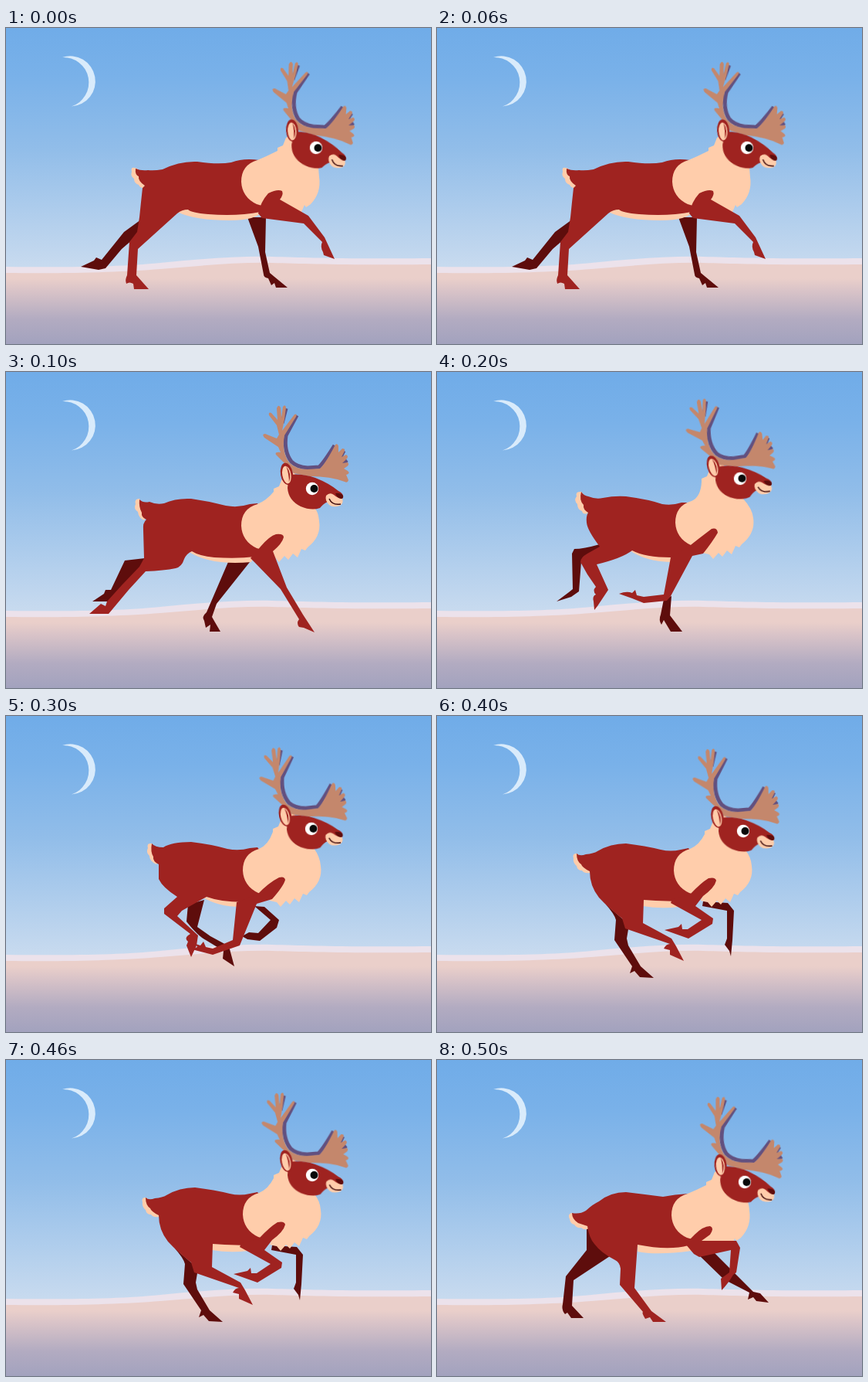
An HTML page that plays this animation: 551x409 px, repeating every 600 ms.

```html
<!DOCTYPE html>
<html lang="en">
<head>
<meta charset="utf-8">
<title>Running reindeer</title>
<style>
  html, body { margin: 0; width: 100%; height: 100%; overflow: hidden; }
  svg { display: block; width: 551px; height: 409px; overflow: hidden; }
  .red { fill: #9f2320; }
  .dark { fill: #5e0d0c; }
  .cream { fill: #ffcdab; }
  .antler { fill: #c4876c; }
  .shade { fill: none; stroke: #62507f; stroke-width: 5; stroke-linejoin: round; }
</style>
</head>
<body>
<svg viewBox="0 0 551 409">
  <defs>
    <linearGradient id="sky" x2="0" y2="1">
      <stop offset="0" stop-color="#70ace8"/>
      <stop offset=".2" stop-color="#79b1e9"/>
      <stop offset=".5" stop-color="#91bde9"/>
      <stop offset="1" stop-color="#c9dbef"/>
    </linearGradient>
    <linearGradient id="ground" gradientUnits="userSpaceOnUse" x1="0" y1="303" x2="0" y2="409">
      <stop offset=".2" stop-color="#eacfca"/>
      <stop offset=".34" stop-color="#dac4c8"/>
      <stop offset=".7" stop-color="#b2abc1"/>
      <stop offset="1" stop-color="#a2a2be"/>
    </linearGradient>
    <g id="head">
      <path class="shade" d="M377 56L363 82Q360 103 370 116Q377 123 391 124L406 123Q413 116 426 95M363 47L358 66M438 102L434 110M442 114L436 119"/>
      <path class="antler" d="M373 131L360 117L350 107Q348 103 356 104L353 97L335 85Q331 80 336 80L351 86L354 81L351 69L341 56Q340 51 344 53L352 62L351 47Q353 41 356 46L357 60L359 45Q362 41 363 46L361 61L358 76L374 55Q378 53 376 58L361 82Q357 103 367 117Q376 126 391 126L407 125Q414 119 427 94Q430 92 431 96L431 104L436 99Q441 99 438 104L435 110L441 107Q445 109 441 113L436 118L443 117Q446 120 441 123L438 125L443 128Q447 131 441 133L444 140Q443 144 439 142Q421 135 394 135Z"/>
      <path class="red" d="M367 133Q384 131 401 137Q419 144 431 154Q437 157 437 161L434 170L417 168Q412 170 407 176Q396 180 382 174Q366 166 365 150Z"/>
      <path class="cream" d="M415 160Q420 155 425 159Q429 163 436 164Q438 170 433 173Q424 176 419 172Q413 166 415 160Z"/>
      <path d="M427 157Q434 156 437 160Q438 164 434 164Q429 163 427 157Z" fill="#5e0d0c"/>
      <path d="M419 164Q423 173 434 171" fill="none" stroke="#3b0909" stroke-width="1.5"/>
      <circle cx="397" cy="151" r="8.2" fill="#fff"/>
      <circle cx="399.5" cy="151" r="5" fill="#090909"/>
      <g transform="rotate(-10 364 132)">
        <ellipse class="red" cx="364" cy="132" rx="8" ry="14.5"/>
        <ellipse class="cream" cx="363.7" cy="133" rx="5.6" ry="11.5"/>
        <path class="red" d="M365 122Q371 133 365 143Q367 133 365 122Z"/>
      </g>
    </g>
  </defs>
  <path fill="url(#sky)" d="M0 0H551V312H0Z"/>
  <path fill="#d9ebfb" d="M73 38A32.6 32.6 0 1 1 85 101.500A32.6 32.6 0 0 0 73 38Z"/>
  <path fill="#ece2eb" d="M0 309C85 310 150 309 200 304S300 295 345 296S420 299 551 298V409H0Z"/>
  <path fill="url(#ground)" d="M0 317C85 318 150 316 200 312S300 303 345 304S430 307 551 306V409H0Z"/>
  <g id="strip"></g>
</svg>
<script>
const W = 551, STEP = 100;

// head: dx, dy, turn; chest: dx, dy; tuft: shaggy lower edge
const poses = [
  {
    head: [5, 4, 5.8], chest: [0, 0], tuft: false,
    farHind: 'M175 248L153 264L124 300L117 297L114 301L97 309L120 313L129 311L150 286L178 262Z',
    farFore: 'M313 245L327 283L334 319Q334 323 340 324L344 333L348 330L350 336L365 336L348 322L342 317L336 290L337 245Z',
    tail: 'M170 182Q161 178 163 186Q161 192 166 195Q166 201 172 203Q174 208 181 207L185 195Z',
    belly: 'M222 238Q245 249 290 249Q325 249 332 237L240 230Z',
    body: 'M168 182Q175 185 184 184Q192 185 203 183Q225 172 248 173Q275 177 292 174Q308 168 328 171L345 200L330 238Q300 244 262 241Q240 239 236 235Q228 235 222 240L171 286L169 320L185 338L166 338L165 331Q160 328 156 331Q154 326 157 320L160 277L170 264L173 245Q175 225 177 207L180 204Q171 198 172 192Q167 190 168 182Z',
    fore: 'M327 240Q330 225 340 214Q352 208 358 211Q360 216 355 222L392 243L413 271L426 299L412 294L411 290Q407 283 410 277L386 253L332 246Z'
  },
  {
    head: [0, 0, 0], chest: [0, 0], tuft: true,
    farHind: 'M180 241L154 244L136 282L129 282L127 287L112 297L134 297L138 291L150 278L172 257Z',
    farFore: 'M288 246L260 311Q253 317 257 322L259 331L265 327L264 336L278 336L271 324L267 317L273 300L316 246Z',
    tail: 'M173 164Q166 164 168 171Q165 177 171 181Q172 189 179 192L184 184Z',
    belly: 'M236 232Q265 251 318 246L322 236Z',
    body: 'M173 165Q178 170 186 168Q195 172 205 170Q220 163 240 164Q262 167 285 173Q301 176 316 171L326 170L345 200L323 239Q300 242 270 240Q250 238 241 232Q234 235 231 242Q228 252 220 254Q205 257 181 258L159 282L133 313L108 313L123 300L129 303L131 297L150 276L173 252L179 241L178 205Q177 195 182 191Q175 188 176 182Q172 175 173 165Z',
    fore: 'M317 241L330 226Q342 212 350 210Q360 209 360 214Q358 222 346 232L364 279L385 314L400 337L386 331L380 330Q376 325 380 320L356 281L322 246Z'
  },
  {
    head: [-4, -13, -5.7], chest: [4, -4], tuft: true,
    farHind: 'M211 223Q190 229 178 229L175 235L176 281L171 285L155 297L174 291L184 284L187 245Q188 238 211 231Z',
    farFore: 'M294 294L290 314Q287 321 291 327L294 321L303 336L318 336L302 315L304 290Z',
    tail: 'M187 155Q179 154 181 161Q177 166 182 171Q182 178 188 180Q189 185 195 183L200 170Z',
    belly: 'M250 231Q270 245 303 246L304 236Z',
    body: 'M187 155Q190 160 196 161Q206 165 215 163Q230 160 245 161Q275 165 292 171Q305 173 317 169L324 169L350 200L332 237L303 240Q270 240 253 231Q240 241 207 249L222 282L208 303L204 308L203 297Q201 290 206 288Q201 283 206 278L195 262L186 246Q186 240 195 235L211 226Q195 205 194 195Q193 187 196 182Q189 178 190 172Q184 166 187 155Z',
    fore: 'M303 240L294 288L268 291L259 289L257 282L253 286Q246 283 236 287L253 293L268 299L298 296L303 290L331 238L345 235Q357 220 364 208Q363 201 356 203Q340 215 325 227Z'
  },
  {
    head: [-1, -5, -3.2], chest: [2, 1], tuft: true,
    farHind: 'M236 244L234 266Q249 285 259 290L282 304L281 314L296 324L289 298L265 285L248 273L257 238Z',
    farFore: 'M322 246L343 264L327 281L315 280L306 285L313 289L329 291L351 274L354 264L335 247Z',
    tail: 'M189 165Q182 164 184 171Q181 177 186 181Q186 188 195 192L200 182Z',
    belly: 'M254 234Q275 247 304 247L305 237Z',
    body: 'M189 165Q193 170 204 170Q215 163 240 163Q266 166 287 172Q302 175 316 171L326 170L350 200L325 240Q285 243 260 234L228 252L222 259L249 284L247 297L240 312L234 297L236 292Q231 288 236 284L239 282L205 256L205 249L222 234Q203 222 198 211L198 192Q190 188 191 182Q187 176 189 165Z',
    fore: 'M299 241L294 290L268 301L259 299L256 292L252 297L246 295L248 299L241 302L268 309L303 297L325 243L345 237Q360 220 362 212Q361 207 354 209Q340 216 326 231Z'
  },
  {
    head: [0, -2, -1.5], chest: [2, 1], tuft: true,
    farHind: 'M218 243Q230 256 232 264L230 290L253 324L250 333L256 330L263 338L281 339L264 324L248 297L246 288L249 270Z',
    farFore: 'M344 246L376 252L376 288L373 296L379 304L381 311L383 290L385 252L377 242L345 240Z',
    tail: 'M181 178Q175 178 177 184Q176 190 181 194Q182 200 188 200Q191 204 198 203L200 190Z',
    belly: 'M266 237L267 246Q290 250 314 247L312 237Z',
    body: 'M181 178Q185 182 193 179Q203 178 208 175Q225 165 245 165Q270 168 290 173Q303 176 316 173L326 171L350 200L325 240Q300 240 268 238L267 268L304 288L310 298L320 317L302 309L302 303L294 301Q297 295 302 295L244 275L240 262Q222 248 210 235Q198 220 198 201Q188 196 187 192Q181 188 181 178Z',
    fore: 'M303 242L343 264L325 276L318 276L317 269L313 273L295 277L326 288L357 269L358 262L335 246L345 233Q360 222 362 213Q361 208 352 210Q342 216 328 231L305 237Z'
  },
  {
    head: [2, 7, 4.6], chest: [-1, 2], tuft: false,
    farHind: 'M194 217L194 246L167 280L163 316Q161 323 166 329L169 327L174 334L190 334L175 318L177 285L224 254Q205 240 196 218Z',
    farFore: 'M338 251L372 284L405 301L403 310L410 307L414 312L430 314L419 302L410 300L358 248Z',
    tail: 'M174 198Q169 200 172 206Q173 212 178 213Q181 218 187 217Q191 221 197 218L200 208Z',
    belly: 'M260 238L260 248Q285 253 330 247L326 237Z',
    body: 'M175 198Q185 200 193 195Q203 186 210 183Q225 171 245 171Q270 174 293 177Q308 174 326 173L350 200L326 240Q300 247 260 239L256 295L278 325L297 339L280 339L276 333L270 335Q265 327 267 326L237 291L238 270Q237 262 231 259Q213 250 204 238Q197 230 195 215L183 211Q175 206 175 198Z',
    fore: 'M322 238L334 226Q345 215 354 215Q360 217 354 226L343 234L388 234L393 243L388 275L384 278Q377 290 369 298L368 283L379 275L381 246L340 255L333 251Z'
  }
];

// The upper neck follows the head, the rest follows the chest.
function ruff({ head, chest, tuft }) {
  const at = ([dx, dy]) => (x, y) => `${x + dx} ${y + dy} `;
  const n = at(head), b = at(chest);
  const edge = tuft
    ? [[391, 227], [388, 231], [383, 229], [378, 240], [372, 235], [366, 243], [361, 238], [354, 246], [349, 240], [340, 238]]
    : [[395, 228], [389, 232], [387, 229], [383, 238], [350, 236]];
  return `M${n(373, 130)}L${n(358, 138)}L${n(354, 148)}L${n(347, 151)}L${n(347, 155)}` +
    `Q${b(338, 166)}${b(326, 171)}Q${b(305, 177)}${b(305, 199)}Q${b(306, 219)}${b(325, 228)}` +
    `L${b(342, 233)}` + edge.reverse().map(p => 'L' + b(...p)).join('') +
    `Q${b(409, 213)}${b(406, 193)}Q${b(405, 181)}${n(400, 176)}L${n(395, 160)}Z`;
}

const path = (cls, d) => `<path class="${cls}" d="${d}"/>`;

function deer(p, i) {
  const [dx, dy, turn] = p.head;
  return `<g transform="translate(${i * W} 0)">` +
    path('dark', p.farHind) + path('dark', p.farFore) +
    path('cream', p.tail) + path('cream', p.belly) +
    path('red', p.body) + path('cream', ruff(p)) + path('red', p.fore) +
    `<use href="#head" transform="translate(${dx} ${dy}) rotate(${turn} 397 151)"/></g>`;
}

const strip = document.getElementById('strip');
strip.innerHTML = poses.map(deer).join('');
strip.animate(
  [{ transform: 'translateX(0px)' }, { transform: `translateX(${-W * poses.length}px)` }],
  { duration: STEP * poses.length, iterations: Infinity, easing: `steps(${poses.length}, end)` }
);
</script>
</body>
</html>
```
